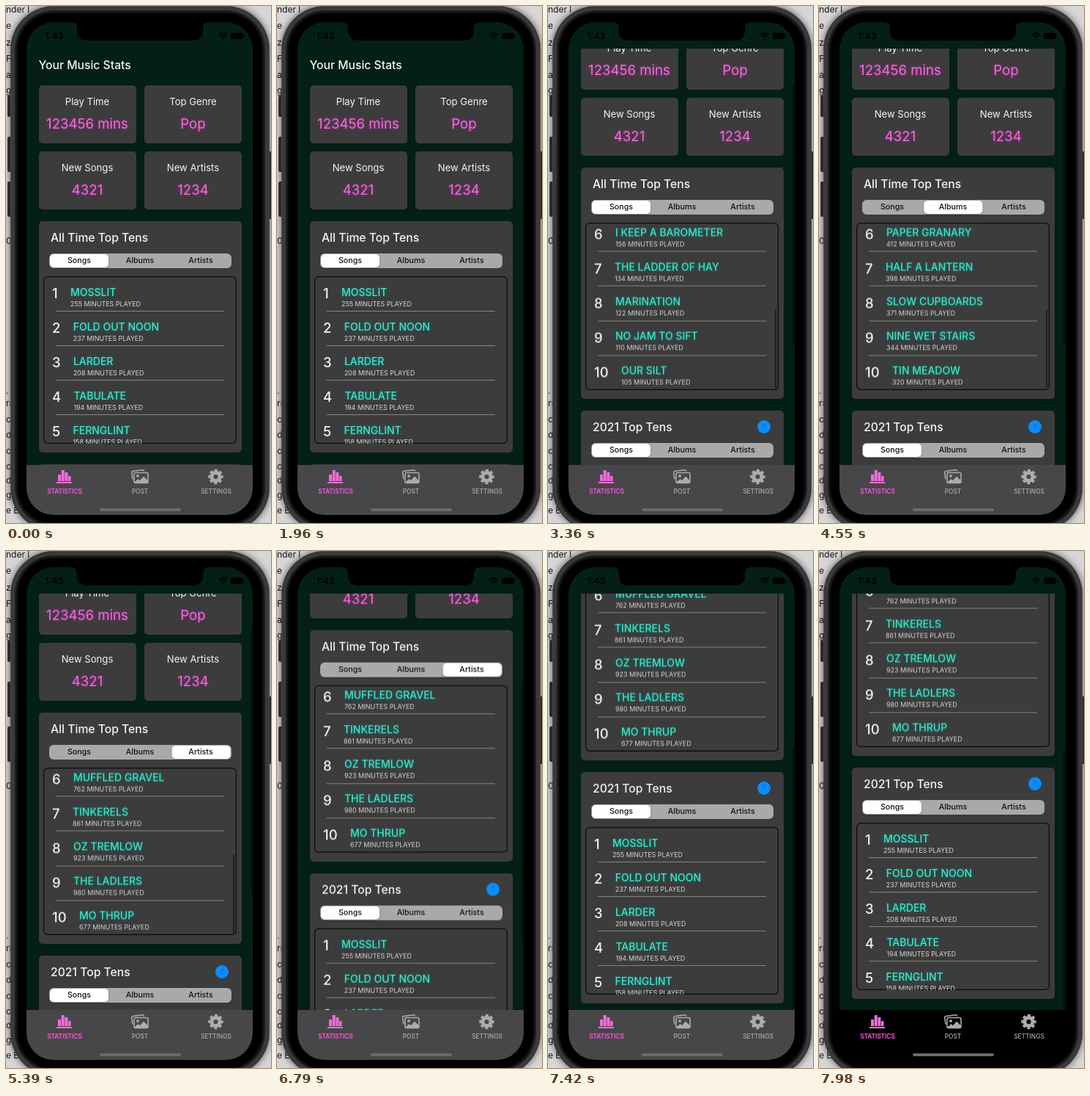
These frames come from a looping animation (362 px wide and 704 px high, 8 s). An HTML page:

```html
<!DOCTYPE html>
<html lang="en">
<head>
<meta charset="utf-8">
<title>Music stats</title>
<style>
  html, body { margin: 0; width: 100%; height: 100%; overflow: hidden; }
  body { position: relative; background: #d6d6d6; color: #f4f4f4; font-family: Inter, Roboto, sans-serif; }
  div, svg, span { position: absolute; box-sizing: border-box; white-space: nowrap; }

  .behind span { left: 0; color: #151515; font-size: 12px; line-height: 16px; }
  .button { width: 6px; border-radius: 2px; background: #353535; }
  .phone {
    left: 7px; top: 1px; width: 352px; height: 713px; border-radius: 58px; background: #000;
    box-shadow: inset 0 0 0 5px #3a3a3a, inset 0 0 3px 8px #202020, 0 0 0 1px #4a4a4a, 0 0 8px 2px rgba(0, 0, 0, .5);
  }
  .screen { left: 28px; top: 22px; width: 309px; height: 671px; border-radius: 37px; overflow: hidden; background: #041e18; }
  .origin { left: -28px; top: -22px; width: 362px; height: 704px; }
  .view { left: 0; top: 58px; width: 362px; height: 567px; overflow: hidden; }
  .page { left: 0; top: -58px; width: 362px; height: 1010px; animation: page 8s infinite; }

  .heading { font-size: 15.7px; font-weight: 500; line-height: 20px; }
  .card { background: #3c3c3d; border-radius: 5px; }
  .stat { width: 133px; height: 79px; text-align: center; }
  .stat span { left: 0; width: 100%; line-height: 24px; }
  .label { top: 10px; font-size: 13.1px; }
  .value { top: 40px; font-size: 18.6px; color: #f06cda; text-shadow: 0 0 4px #a02c8c; }
  .tens { left: 44.5px; width: 277px; height: 315px; }
  .tens > .heading { left: 16.5px; top: 12.5px; }
  .help {
    left: 241.5px; top: 13px; width: 18px; height: 18px; border-radius: 50%; background: #0a8cff;
    color: #0b5cb4; font-size: 9px; line-height: 18px; text-align: center;
  }
  .segments { left: 14px; top: 44px; width: 249px; height: 20px; border-radius: 6px; background: #a9a9aa; color: #111; }
  .segments span { top: 0; width: 83px; line-height: 20px; font-size: 10.7px; font-weight: 500; text-align: center; }
  .thumb { left: 1px; top: 1px; width: 80px; height: 18px; border-radius: 5px; background: #fff; box-shadow: 0 1px 3px rgba(0, 0, 0, .25); }
  .list { left: 6px; top: 75px; width: 264px; height: 228px; border-radius: 6px; overflow: hidden; box-shadow: inset 0 0 0 1.2px #0a0a0a; }
  .rows { left: 0; top: 0; width: 100%; height: 471px; }
  .set { left: 0; top: 0; width: 100%; height: 100%; }
  .row { left: 12.5px; width: 240px; height: 47.1px; display: flex; gap: 17.3px; }
  .row div { position: static; }
  .num { font-size: 18.5px; font-weight: 500; line-height: 47px; }
  .name { margin-top: 11.5px; font-size: 14px; font-weight: 500; line-height: 20px; color: #46e4ca; text-shadow: 0 0 4px #0c7868; }
  .mins { font-size: 8.95px; line-height: 12px; color: #d6d6d6; }
  .row:not(.last)::after { content: ""; position: absolute; left: 4.5px; top: 46.9px; width: 230px; height: 1px; background: #858586; }
  .bar { border-radius: 1px; background: rgba(0, 0, 0, .5); }

  .first .thumb { animation: thumb 8s infinite ease-in-out; }
  .first .rows { animation: rows 8s infinite; }
  .first .songs { animation: songs 8s infinite step-end; }
  .albums { animation: albums 8s infinite step-end; }
  .artists { animation: artists 8s infinite step-end; }
  .list-bar { left: 259px; top: 5px; width: 2px; height: 107px; animation: listBar 8s infinite; }
  .page-bar { left: 334px; top: 60px; width: 2px; height: 355px; animation: pageBar 8s infinite; }
  .dots { animation: dots 8s infinite step-end; }

  .tabs { left: 0; top: 625px; width: 362px; height: 79px; background: #474749; animation: tabs 8s infinite linear; }
  .tab { top: 29.5px; width: 100px; line-height: 12px; font-size: 8.4px; font-weight: 500; text-align: center; color: #acacae; }
  .tab.on { color: #f06cda; text-shadow: 0 0 4px #a02c8c; }
  .home { left: 128px; top: 58.5px; width: 111px; height: 4.5px; border-radius: 3px; background: #6a6a6d; }
  .clock { left: 46px; top: 33px; width: 40px; line-height: 16px; font-size: 12.4px; font-weight: 600; text-align: center; color: #000; }

  @keyframes page {
    0%, 26.25% { transform: translateY(0); animation-timing-function: cubic-bezier(.3, .4, .3, 1); }
    33.5%, 80% { transform: translateY(-73px); animation-timing-function: cubic-bezier(.3, .4, .3, 1); }
    87%, 89.75% { transform: translateY(-191px); animation-timing-function: cubic-bezier(.215, .61, .355, 1); }
    94.2%, 100% { transform: translateY(-329px); }
  }
  @keyframes pageBar {
    0%, 26.2% { transform: translateY(0); opacity: 0; }
    26.25% { transform: translateY(0); opacity: 1; animation-timing-function: cubic-bezier(.3, .4, .3, 1); }
    33.5%, 80% { transform: translateY(47px); animation-timing-function: cubic-bezier(.3, .4, .3, 1); }
    87%, 89.75% { transform: translateY(122px); animation-timing-function: cubic-bezier(.215, .61, .355, 1); }
    94.2%, 100% { transform: translateY(210px); opacity: 1; }
  }
  @keyframes rows {
    0%, 35% { transform: translateY(0); animation-timing-function: cubic-bezier(.3, .5, .3, 1); }
    41.6%, 100% { transform: translateY(-243.5px); }
  }
  @keyframes listBar {
    0%, 34.9% { transform: translateY(0); opacity: 0; }
    35% { transform: translateY(0); opacity: 1; animation-timing-function: cubic-bezier(.3, .5, .3, 1); }
    41.6%, 77% { transform: translateY(113px); opacity: 1; }
    80%, 100% { transform: translateY(113px); opacity: 0; }
  }
  @keyframes thumb {
    0%, 48.75% { transform: translateX(0); }
    51.5%, 60% { transform: translateX(83.3px); }
    62.75%, 100% { transform: translateX(166.6px); }
  }
  @keyframes songs { 0% { opacity: 1; } 48.75%, 100% { opacity: 0; } }
  @keyframes albums { 0% { opacity: 0; } 48.75% { opacity: 1; } 60%, 100% { opacity: 0; } }
  @keyframes artists { 0% { opacity: 0; } 60%, 100% { opacity: 1; } }
  @keyframes dots { 0% { opacity: 0; } 14%, 100% { opacity: 1; } }
  @keyframes tabs { 0%, 94% { background: #474749; } 95.5%, 100% { background: #000; } }
</style>
</head>
<body>
<div class="behind" id="behind"></div>
<div class="button" style="left:2px;top:122px;height:29px"></div>
<div class="button" style="left:2px;top:178px;height:48px"></div>
<div class="button" style="left:2px;top:239px;height:48px"></div>
<div class="button" style="left:358px;top:198px;height:92px"></div>
<div class="phone"></div>
<div class="screen"><div class="origin">
  <div class="view">
    <div class="page" id="page">
      <span class="heading" style="left:44.5px;top:71px">Your Music Stats</span>
    </div>
  </div>
  <div class="bar page-bar"></div>
  <span class="clock">1:43</span>
  <svg width="362" height="60" style="left:0;top:0">
    <path d="M88 21V22Q97 22 97 30V33Q97 47 111 47H255Q269 47 269 33V30Q269 22 278 22V21Z"/>
    <g class="dots" fill="#02100c"><circle cx="275" cy="43" r="1"/><circle cx="279" cy="43" r="1"/><circle cx="283" cy="43" r="1"/></g>
    <g fill="none" stroke="#000" stroke-width="2">
      <path d="M290.5 39.5Q296 34.5 301.5 39.5M292.7 42Q296 39 299.3 42"/>
      <path d="M296 43.5V45.5"/>
    </g>
    <rect x="307" y="36.5" width="16.5" height="8.5" rx="2.5"/><rect x="324.3" y="39" width="1.2" height="3.5" rx=".6"/>
  </svg>
  <div class="tabs">
    <svg width="362" height="30" style="left:0;top:0">
      <g fill="#f06cda">
        <rect x="69" y="23" width="21" height="2"/>
        <rect x="71" y="13" width="4" height="9"/><rect x="75.7" y="7" width="4" height="15"/>
        <rect x="80.4" y="10" width="4" height="12"/><rect x="85" y="15" width="3.5" height="7"/>
      </g>
      <g fill="none" stroke="#acacae" stroke-width="1.6" stroke-linejoin="round">
        <path d="M173 19.5L171.7 10.5Q171.5 8.8 173 8.5L186.5 6.7Q188.2 6.5 188.6 8.5"/>
        <rect x="175" y="10.5" width="19" height="14" rx="2"/>
      </g>
      <g fill="#acacae"><circle cx="180" cy="15" r="1.9"/><path d="M176 23L180.5 19L183 21L188 15.5L193.5 21V24H176Z"/></g>
      <g fill="none" stroke="#acacae" transform="translate(286.5 16)">
        <circle r="5.6" stroke-width="5"/>
        <circle r="8.7" stroke-width="3.2" stroke-dasharray="3.9 2.933" stroke-dashoffset="1.95"/>
      </g>
    </svg>
    <span class="tab on" style="left:30px">STATISTICS</span>
    <span class="tab" style="left:133px">POST</span>
    <span class="tab" style="left:237px">SETTINGS</span>
    <div class="home"></div>
  </div>
</div></div>
<script>
  const page = document.getElementById('page');
  const add = html => page.insertAdjacentHTML('beforeend', html);

  const songs = ['MOSSLIT 255', 'FOLD OUT NOON 237', 'LARDER 208', 'TABULATE 194', 'FERNGLINT 158',
    'I KEEP A BAROMETER 156', 'THE LADDER OF HAY 134', 'MARINATION 122', 'NO JAM TO SIFT 110', 'OUR SILT 105'];
  // Only the lower half of these charts ever scrolls into view.
  const albums = ['PAPER GRANARY 412', 'HALF A LANTERN 398', 'SLOW CUPBOARDS 371', 'NINE WET STAIRS 344', 'TIN MEADOW 320'];
  const artists = ['MUFFLED GRAVEL 762', 'TINKERELS 861', 'OZ TREMLOW 923', 'THE LADLERS 980', 'MO THRUP 677'];

  function row(item, i) {
    const cut = item.lastIndexOf(' ');
    return `<div class="row${i === 9 ? ' last' : ''}" style="top:${i * 47.1}px"><div class="num">${i + 1}</div>
      <div><div class="name">${item.slice(0, cut)}</div>
      <div class="mins">${item.slice(cut + 1)} MINUTES PLAYED</div></div></div>`;
  }

  const chart = (name, items) =>
    `<div class="set ${name}">${items.map((item, i) => row(item, i + 10 - items.length)).join('')}</div>`;

  function tens(title, top, cls, charts, extra = '') {
    const tabs = ['Songs', 'Albums', 'Artists'].map((t, i) => `<span style="left:${i * 83}px">${t}</span>`).join('');
    add(`<div class="card tens ${cls}" style="top:${top}px"><span class="heading">${title}</span>${extra}
      <div class="segments"><div class="thumb"></div>${tabs}</div>
      <div class="list"><div class="rows">${charts}</div>${cls ? '<div class="bar list-bar"></div>' : ''}</div></div>`);
  }

  [['Play Time', '123456 mins'], ['Top Genre', 'Pop'], ['New Songs', '4321'], ['New Artists', '1234']]
    .forEach(([label, value], i) => add(
      `<div class="card stat" style="left:${i % 2 ? 189 : 44.5}px;top:${i < 2 ? 108 : 198}px">
       <span class="label">${label}</span><span class="value">${value}</span></div>`));

  tens('All Time Top Tens', 293, 'first', chart('songs', songs) + chart('albums', albums) + chart('artists', artists));
  tens('2021 Top Tens', 624, '', chart('songs', songs), '<div class="help">?</div>');

  const scraps = { 5: 'nder l', 27: 'e', 50: 'ze', 72: 'F', 94: 'a', 115: 'g', 320: '0', 524: '.', 541: 'rr',
    563: 'c', 584: 'd', 606: 'c', 627: 'c', 646: 'd', 666: 'g', 687: 'e E' };
  document.getElementById('behind').innerHTML = Object.entries(scraps)
    .map(([y, text]) => `<span style="top:${y - 8}px">${text}</span>`).join('');
</script>
</body>
</html>
```
